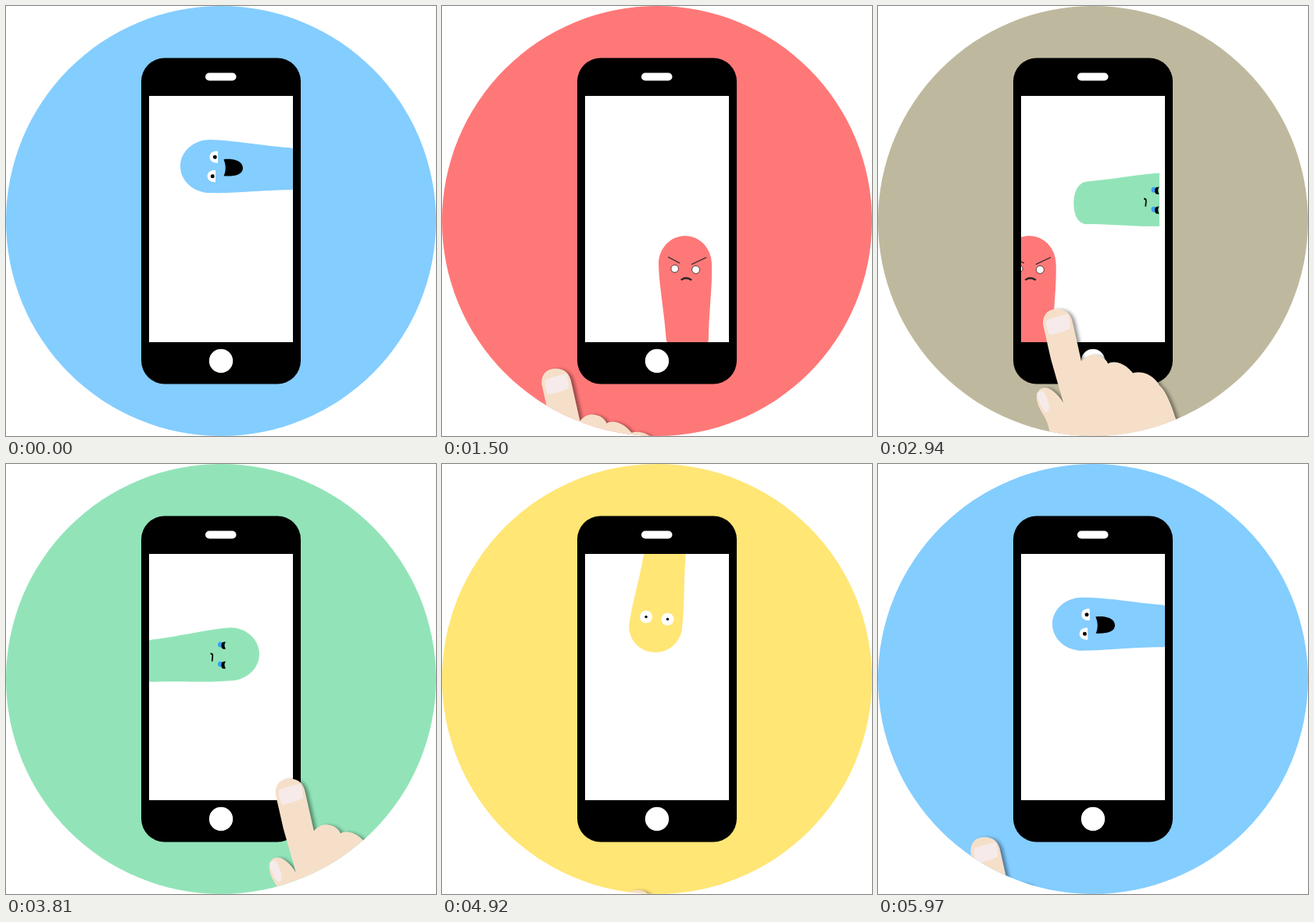
Write an HTML page that moves like this. It is 550x550 px and loops after 6000 ms.

```html
<!DOCTYPE html>
<html lang="en">
<head>
<meta charset="utf-8">
<title>Swiping monsters</title>
<style>
  html, body { margin: 0; width: 100%; height: 100%; overflow: hidden; background: #fff; }
  svg { display: block; width: 100vw; height: 100vh; }
  #hand { filter: drop-shadow(4px 1px 2px rgba(0, 0, 0, .4)); }
</style>
</head>
<body>
<svg viewBox="0 0 550 550">
  <defs>
    <clipPath id="disc"><circle cx="275" cy="275" r="275"/></clipPath>
    <clipPath id="screen"><rect x="183" y="115" width="184" height="315"/></clipPath>
    <clipPath id="narrow"><rect x="183" y="115" width="177" height="315"/></clipPath>
    <g id="happyEye">
      <path d="M7.5,5C9,-9 -9,-9 -7.5,5Z" fill="#fff"/>
      <circle cy="1.2" r="2.5"/>
    </g>
    <g id="sadEye">
      <circle cx="-1" cy="2.5" r="3.6" fill="#3aa0f5"/>
      <path d="M-4.5,-4Q0,-1 4.5,-4Q6,2 0,1.5Q-5,2 -4.5,-4Z"/>
    </g>
    <g id="blankEye"><circle r="8" fill="#fff"/><circle r="1.7"/></g>
  </defs>

  <circle id="back" cx="275" cy="275" r="275"/>
  <rect x="173" y="66.5" width="204" height="417" rx="30"/>
  <rect x="183" y="115" width="184" height="315" fill="#fff"/>
  <rect x="255" y="85.5" width="39.5" height="10" rx="5" fill="#fff"/>
  <circle cx="275" cy="454" r="15.2" fill="#fff"/>

  <g clip-path="url(#screen)">
    <g id="blue">
      <path class="body"/>
      <g class="face">
        <use href="#happyEye" x="12" y="1.5"/>
        <use href="#happyEye" x="-12.5" y="-1.5"/>
        <path d="M9,14C10,22 9,38 -2,38.5C-12,38.5 -13,24 -12,14C-6,17 2,17 9,14Z"/>
      </g>
    </g>
    <g id="red">
      <path class="body"/>
      <g class="face" fill="none" stroke="#222">
        <g fill="#fff" stroke-width=".8"><circle cx="-13.5" cy="-.5" r="4.8"/><circle cx="13.5" cy=".8" r="5"/></g>
        <path d="M-22,-15.5L-7,-7.5M27,-15L8,-6" stroke-width="1.3"/>
        <path d="M-5.5,14Q.5,9 8,14" stroke-width="2.2"/>
      </g>
    </g>
    <g clip-path="url(#narrow)">
      <g id="green">
        <path class="body"/>
        <g class="face">
          <use href="#sadEye" x="-12"/>
          <use href="#sadEye" x="13"/>
          <path d="M-1.5,15.5Q-1.5,12.7 1,12.7L8.5,13.4" fill="none" stroke="#111" stroke-width="1.8"/>
        </g>
      </g>
    </g>
    <g id="yellow">
      <path class="body"/>
      <g class="face">
        <use href="#blankEye" x="13.5" y="1.5"/>
        <use href="#blankEye" x="-14" y="-1.5"/>
      </g>
    </g>
  </g>

  <g clip-path="url(#disc)">
    <g id="hand">
      <path fill="#f6dfc9" d="M-19,20C-20,8 -13,0 -1,0C10,0 17,6 19,18L30,67C36,60 42,58 48,59C56,60 62,64 64,70
        C70,66 84,67 96,82C108,79 122,84 130,98C140,106 147,130 151,141L175,240H0L-9,169
        C-11,150 -14,143 -19,135C-27,122 -30,112 -24,104C-16,96 -3,104 7,120L-9,64Z"/>
      <g fill="#f6ebea">
        <path d="M-15,15Q-2,9 13,7Q16,16 16,25Q4,31 -11,33Q-15,25 -15,15Z"/>
        <path d="M-27,108Q-22,103 -18,106Q-12,116 -11,127Q-12,132 -16,132Q-25,121 -27,108Z"/>
      </g>
    </g>
  </g>
</svg>

<script>
const LOOP = 6000, SWIPE = 196, PITCH = 196;
const starts = [1290, 2830, 4350, 5742];
const el = id => document.getElementById(id);
const mix = (a, b, k) => a + (b - a) * k;
const ease = u => u * u * (3 - 2 * u);
const wave = (t, zero, period) => Math.sin(2 * Math.PI * (t - zero) / period);

// x, y: foot of the body on the screen edge; turn: way it grows; eyes: height of the face
const monsters = [
  { id: 'blue', color: [132, 205, 255], x: 367, y: 208.5, turn: -90, length: 144, eyes: 102.5,
    pose(t) {
      const v = wave(t > LOOP / 2 ? LOOP - t : t, 0, 1260), w = .1 * v * v - .9 * v;
      return { shift: -7.5 * w, lean: 3.5 + 5.5 * w, bow: -8 * w, tilt: 7 * w };
    } },
  { id: 'red', color: [255, 120, 120], x: 314, y: 430, turn: 0, length: 136, eyes: 93.5,
    pose: t => ({ lean: -3 - 8 * wave(t, 1500, 1440) }) },
  { id: 'green', color: [146, 228, 184], x: 183, y: 252, turn: 90, length: 141, eyes: 94,
    pose: t => ({ lean: -6.9 + 2.4 * wave(t, 2565, 1500) }) },
  { id: 'yellow', color: [255, 230, 117], x: 285, y: 115, turn: 180, length: 126, eyes: 82,
    pose: t => ({ lean: 12 + 7 * wave(t, 4920, 1440) }) }
];
for (const m of monsters) {
  m.group = el(m.id);
  m.body = m.group.querySelector('.body');
  m.face = m.group.querySelector('.face');
  m.body.setAttribute('fill', `rgb(${m.color})`);
}

// Half outline from foot to crown, as curve points: x and height relative to the length
const half = [[0, -.08], [10, -.08], [24, -.06], [27, .02], [29, .33], [34, .51], [34, .735],
  [34, .88], [19, 1], [0, 1]];
const outline = [...half, ...half.slice(0, -1).reverse().map(([x, h]) => [-x, h])];

// Sideways offset of the body's middle line at a relative height
function spine({ shift = 0, lean = 0, bow = 0 }, h) {
  const u = Math.min(1, h / .75);
  return shift + lean * u + bow * 4 * u * (1 - u);
}

function drawMonster(m, t, gap) {
  m.group.style.display = Math.abs(gap) < 1 ? '' : 'none';
  m.group.setAttribute('transform', `translate(${m.x + gap * PITCH} ${m.y}) rotate(${m.turn})`);
  const pose = m.pose(t);
  const [first, ...rest] = outline.map(([x, h]) => [x + spine(pose, h), -h * m.length]);
  m.body.setAttribute('d', `M${first}C${rest.join(' ')}Z`);
  m.face.setAttribute('transform',
    `translate(${spine(pose, m.eyes / m.length)} ${-m.eyes}) rotate(${pose.tilt || 0})`);
}

// Hand path around each swipe: time from its start, x, y of the fingertip
const gesture = [[-720, 400, 545], [-540, 364, 403], [-420, 341, 373], [-60, 339, 375],
  [0, 338, 374], [110, 231, 387], [210, 147, 463], [320, 122, 535], [570, 250, 545]];
const keys = starts.flatMap(s => gesture.map(([t, x, y]) => [s + t, x, y]));

function handAt(t) {
  const i = keys.findIndex(k => k[0] > t) - 1;
  if (i < 0) return keys[0].slice(1);
  const slope = (k, j) => {
    const a = keys[Math.max(k - 1, 0)], b = keys[Math.min(k + 1, keys.length - 1)];
    return (b[j] - a[j]) / (b[0] - a[0]);
  };
  const a = keys[i], b = keys[i + 1], h = b[0] - a[0], u = (t - a[0]) / h;
  return [1, 2].map(j => mix(a[j], b[j], ease(u)) +
    h * u * (1 - u) * ((1 - u) * slope(i, j) - u * slope(i + 1, j)));
}

// Number of pages swiped so far
const pageAt = t => starts.reduce((sum, s) =>
  sum + ease(Math.min(1, Math.max(0, (t - s) / SWIPE))), 0);

function draw(t) {
  const page = pageAt(t), from = Math.floor(page), n = monsters.length;
  const next = monsters[(from + 1) % n].color;
  const rgb = monsters[from % n].color.map((c, i) => Math.round(mix(c, next[i], page - from)));
  el('back').setAttribute('fill', `rgb(${rgb})`);

  monsters.forEach((m, i) => drawMonster(m, t, (page > i + n / 2 ? i + n : i) - page));
  el('hand').setAttribute('transform', `translate(${handAt(t).join(' ')})`);
}

const begin = performance.now();
function tick() {
  draw((performance.now() - begin) % LOOP);
  requestAnimationFrame(tick);
}
tick();
</script>
</body>
</html>
```
